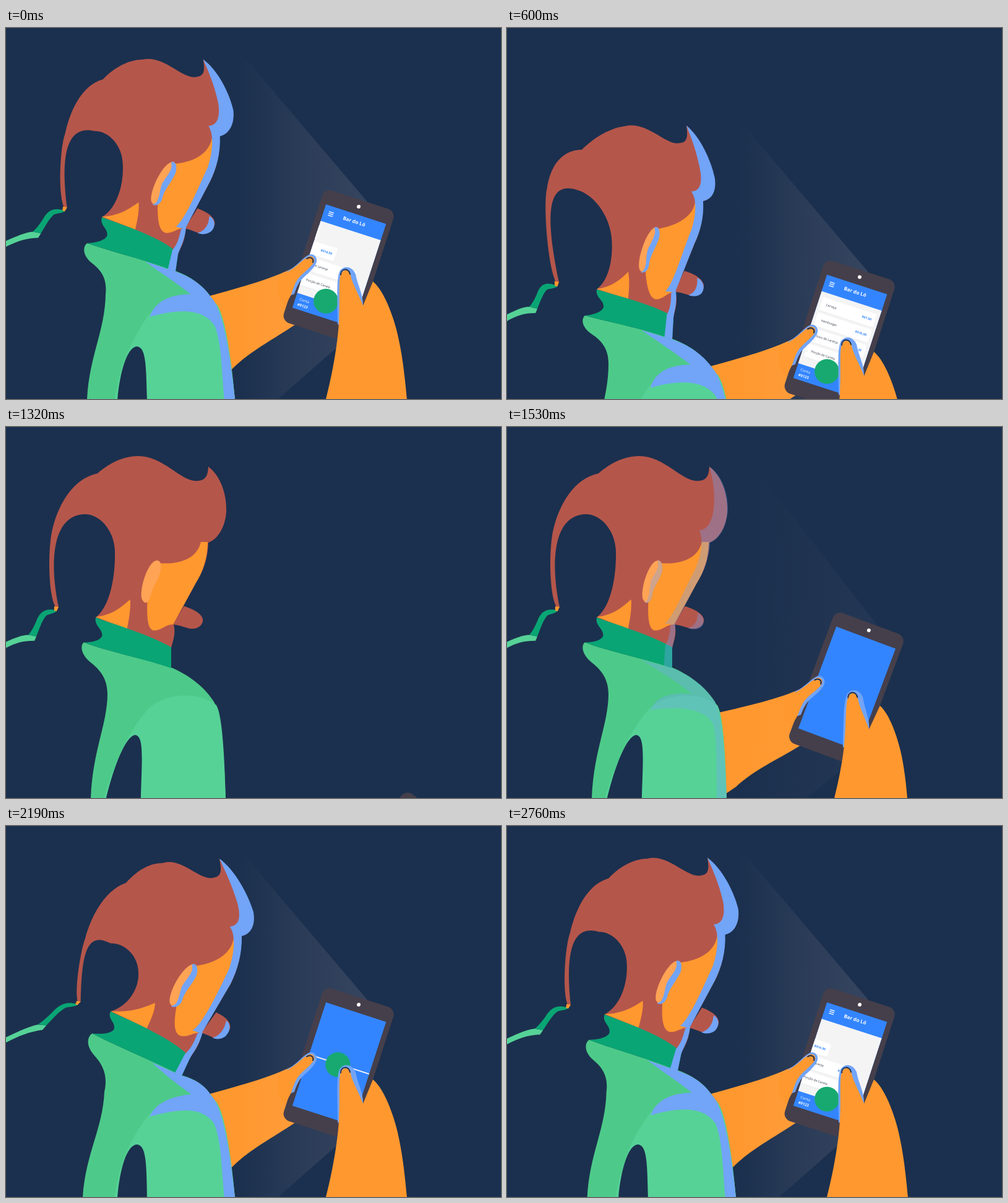
An HTML page with a canvas that plays this animation: 800 by 600 pixels, repeating every 2.79 s.

```html
<!DOCTYPE html>
<html lang="pt">
<head>
<meta charset="utf-8">
<title>Bar app</title>
<style>
html, body { margin: 0; width: 100%; height: 100%; overflow: hidden; background: #1b304e; }
canvas { display: block; width: 800px; height: 600px; }
</style>
</head>
<body>
<canvas id="stage" width="800" height="600"></canvas>
<script>
const LOOP = 2790, ENTER = 780;
const NAVY = '#1b304e', BLUE = '#72a4f7', ORANGE = '#ff982f', BROWN = '#b5564b';
const GREEN = '#4dca89', LIGHT = '#56d297', DARK = '#0aa574', APP = '#3385ff';

const ctx = document.getElementById('stage').getContext('2d');
const buffer = document.createElement('canvas');
buffer.width = 800;
buffer.height = 600;
const bufCtx = buffer.getContext('2d');

const clamp = p => Math.max(0, Math.min(1, p));
const span = (t, start, length) => clamp((t - start) / length);
const mix = (a, b, p) => a + (b - a) * p;
const easeIn = p => p * p;
const easeOut = p => 1 - (1 - p) * (1 - p);
const easeBoth = p => p < .5 ? 2 * p * p : 1 - 2 * (1 - p) * (1 - p);

// Landmarks: tip, crown, bump, back, tail end, gap top, gap right, ear top, ear bottom,
// fringe, brow, nose, chin, collar (4), waist, hem, armhole (3), hip, shoulder, cord (2), side.
const POSES = {
  look: [333,68, 218,48, 152,76, 73,210, 81,291, 133,140, 178,200, 246,217, 225,286,
    359,130, 330,188, 318,317, 238,329, 146,307, 267,360, 267,391, 123,360, 164,430, 137,600,
    212,515, 180,600, 228,600, 370,600, 330,433, 0,352, 45,340, 358,470],
  lean: [320,52, 221,51, 157,83, 91,210, 95,290, 145,167, 189,222, 267,217, 241,287,
    366,130, 345,175, 337,320, 257,331, 155,306, 278,366, 274,394, 127,357, 161,430, 131,600,
    212,515, 180,600, 228,600, 370,600, 330,433, 0,350, 50,333, 358,470],
  bend: [346,54, 253,60, 194,92, 125,210, 117,284, 170,190, 214,237, 300,224, 271,293,
    398,136, 380,178, 361,331, 281,339, 169,300, 297,376, 284,404, 134,344, 159,430, 124,600,
    212,515, 180,600, 228,600, 370,600, 330,433, 0,347, 58,324, 358,470],
  rest: [291,45, 190,45, 121,83, 64,190, 80,297, 116,149, 169,225, 238,209, 220,282,
    334,125, 316,166, 318,306, 240,325, 145,309, 269,355, 267,390, 123,360, 164,430, 137,600,
    212,515, 180,600, 228,600, 370,600, 330,433, 0,356, 43,341, 358,470],
  stand: [328,65, 213,47, 148,75, 71,210, 81,291, 128,141, 176,200, 243,216, 225,285,
    356,130, 327,187, 318,315, 238,329, 145,308, 267,358, 267,390, 123,357, 164,432, 137,600,
    209,498, 161,600, 218,600, 355,600, 332,438, 0,353, 43,340, 352,470],
  back: [201,24, 147,54, 75,98, 5,200, 60,300, 92,157, 170,240, 217,198, 212,274,
    285,100, 282,135, 318,286, 237,318, 147,316, 274,348, 272,387, 122,362, 174,430, 137,600,
    209,496, 157,600, 220,600, 358,600, 322,430, 0,362, 40,345, 355,470]
};

const MAN = [
  [LIGHT, 'M51 339 L38 336 C25 336 12 342 -12 351 L-12 362 C12 350 25 345 48 346 Z'],
  [DARK, 'M83 297 L80 296 C62 293 55 300 50 315 C46 325 42 332 38 336 L51 339 C56 325 60 312 66 305 C72 302 78 302 83 297 Z'],
  [BROWN, 'M80 291 C68 270 70 190 80 160 C90 125 112 84 152 76 C168 62 192 48 218 48 C260 48 288 92 315 89 C328 88 331 80 332 67 C352 82 360 110 359 135 C358 160 346 182 330 188 C329 215 320 237 308 255 L271 321 C275 340 268 350 267 361 L146 307 C168 290 178 245 178 200 C178 165 155 140 132 140 C84 142 70 205 85 291 Z'],
  [ORANGE, 'M78 290 L85 291 L82 298 L78 297 Z'],
  [BROWN, 'M288 292 C300 296 315 302 318 312 C320 322 308 330 296 328 C286 325 278 322 270 321 Z'],
  [ORANGE, 'M318 187 L329 187 C328 215 320 237 308 255 L270 321 C258 320 250 331 238 329 C226 325 228 295 229 275 C234 260 252 240 250 221 C285 225 312 213 318 187 Z'],
  ['#ffa355', 'M246 217 C232 218 215 265 220 280 C226 291 232 283 235 272 C238 258 252 245 253 228 C254 220 250 216 246 217 Z'],
  [ORANGE, 'M146 306 C172 304 188 290 201 279 C202 295 199 310 196 326 Z'],
  [GREEN, 'M126 351 C160 362 220 374 267 390 C300 402 320 420 332 436 C350 455 362 520 370 600 L370 602 L137 602 L137 600 C140 530 164 490 164 430 C164 405 152 392 137 382 C120 370 120 356 126 351 Z'],
  [DARK, 'M146 307 C180 320 230 335 267 358 L267 391 C220 374 160 362 126 351 C140 350 153 346 156 338 C157 325 143 322 146 307 Z'],
  [LIGHT, 'M176 602 C185 545 205 500 232 462 C260 432 310 424 340 446 C352 460 363 520 370 602 Z'],
  [NAVY, 'M180 603 C184 560 196 515 212 515 C226 517 226 545 228 603 Z']
];
const RIM = [
  'M332 67 C352 80 361 108 360 133 C358 162 346 182 331 188 C329 215 320 237 308 255 L271 321 C266 322 260 319 255 319 C270 308 290 260 305 235 C315 215 322 185 314 168 C326 167 336 155 338 125 C340 100 336 82 332 67 Z',
  'M308 303 C318 307 321 318 314 325 C308 330 298 330 292 327 C302 325 309 316 308 303 Z',
  'M246 217 C252 216 256 224 253 236 C248 250 236 262 235 276 C232 285 226 288 221 284 C232 284 230 262 234 250 C240 238 250 230 246 217 Z',
  'M264 322 L272 320 C273 340 268 350 267 361 L267 391 L254 387 L256 354 C262 345 263 335 264 322 Z',
  'M216 376 L267 391 C300 402 320 420 332 436 C350 455 362 520 370 602 L353 602 C349 560 349 510 338 482 C318 452 275 455 232 467 C240 440 265 430 297 430 C270 410 250 398 216 376 Z'
];

// Thin-plate warp from the "look" landmarks to another pose.
function solve(m, rhs) {
  const n = m.length, a = m.map((row, i) => [...row, rhs[i]]);
  for (let i = 0; i < n; i++) {
    let best = i;
    for (let r = i + 1; r < n; r++) if (Math.abs(a[r][i]) > Math.abs(a[best][i])) best = r;
    [a[i], a[best]] = [a[best], a[i]];
    for (let r = 0; r < n; r++) {
      if (r === i) continue;
      const f = a[r][i] / a[i][i];
      for (let c = i; c <= n; c++) a[r][c] -= f * a[i][c];
    }
  }
  return a.map((row, i) => row[n] / row[i]);
}
const pairs = list => list.reduce((out, v, i) => (i % 2 ? out[out.length - 1].push(v) : out.push([v]), out), []);
const marks = pairs(POSES.look).map(([x, y]) => [x / 100, y / 100]);
const kernel = (dx, dy) => {
  const d = dx * dx + dy * dy;
  return d ? d * Math.log(d) : 0;
};
const basis = (x, y) => [...marks.map(m => kernel(x - m[0], y - m[1])), 1, x, y];
const matrix = marks.map(m => basis(m[0], m[1]));
[() => 1, m => m[0], m => m[1]].forEach(f => matrix.push([...marks.map(f), 0, 0, 0]));

const warps = {};
for (const name in POSES) {
  const pts = pairs(POSES[name]);
  warps[name] = [0, 1].map(k => solve(matrix, [...pts.map(p => p[k]), 0, 0, 0]));
}
const dot = (a, b) => a.reduce((s, v, i) => s + v * b[i], 0);

function shape(path) {
  const cmds = path.match(/[MLCZ]/g).join('');
  const pts = pairs(path.match(/-?\d+/g).map(Number));
  const at = {};
  for (const name in warps) {
    at[name] = pts.map(([x, y]) => {
      const b = basis(x / 100, y / 100);
      return [dot(b, warps[name][0]), dot(b, warps[name][1])];
    });
  }
  return { cmds, at };
}
const man = MAN.map(([color, path]) => ({ color, form: shape(path) }));
const rim = RIM.map(shape);

function fillShape(c, form, pose, color) {
  let i = 0;
  const next = () => {
    const a = form.at[pose.from][i], b = form.at[pose.to][i++];
    return [mix(a[0], b[0], pose.p), mix(a[1], b[1], pose.p)];
  };
  c.beginPath();
  for (const cmd of form.cmds) {
    if (cmd === 'M') c.moveTo(...next());
    else if (cmd === 'L') c.lineTo(...next());
    else if (cmd === 'C') c.bezierCurveTo(...next(), ...next(), ...next());
    else c.closePath();
  }
  c.fillStyle = color;
  c.fill();
}

const MOVES = [
  [780, 960, 'back', 'back', easeOut],
  [960, 1320, 'back', 'stand', easeBoth],
  [1620, 1770, 'stand', 'look', easeIn],
  [1770, 2150, 'look', 'bend', easeBoth],
  [2500, 2790, 'bend', 'lean', easeIn],
  [2790, 3080, 'lean', 'rest', easeOut]
];
function poseAt(t) {
  const [start, end, from, to, ease] = MOVES.filter(m => m[0] <= t).pop() || MOVES[0];
  return { from, to, p: ease(span(t, start, end - start)) };
}

function drawMan(c, t) {
  const pose = poseAt(t);
  c.save();
  if (t < 1200) c.translate(-87 * ((1200 - t) / 240) ** 3, 0);
  man.forEach(m => fillShape(c, m.form, pose, m.color));
  c.globalAlpha *= span(t, 1480, 150);
  if (c.globalAlpha > 0 && t > 1480) rim.forEach(f => fillShape(c, f, pose, BLUE));
  c.restore();
}

const fillPath = (c, d, color) => {
  c.fillStyle = color;
  c.fill(new Path2D(d));
};
function strokePath(c, d) {
  c.strokeStyle = NAVY;
  c.lineWidth = 2;
  c.lineCap = 'round';
  c.stroke(new Path2D(d));
}
function box(c, x, y, w, h, r, color) {
  c.fillStyle = color;
  c.beginPath();
  c.roundRect(x, y, w, h, r);
  c.fill();
}
function disc(c, x, y, r, color) {
  c.fillStyle = color;
  c.beginPath();
  c.arc(x, y, r, 0, 7);
  c.fill();
}
function label(c, text, x, y, size, color, weight = 400, align = 'left') {
  c.font = `${weight} ${size}px "Open Sans", sans-serif`;
  c.textAlign = align;
  c.textBaseline = 'middle';
  c.fillStyle = color;
  c.fillText(text, x, y);
}

const CARDS = [
  ['Cerveja', 'R$7,90', 2690],
  ['Hamburger', 'R$16,90', 2580],
  ['Suco de Laranja', 'R$6,30', 2470],
  ['Porção de Canela', 'R$9,90', 2430]
];
const W = 102.5, H = 176;

function drawScreen(c, t) {
  const open = easeBoth(span(t, 2165, 340));
  const top = mix(88.5, 28, open), foot = mix(89, 150.5, open);
  c.save();
  c.beginPath();
  c.rect(0, 0, W, H);
  c.clip();
  c.fillStyle = APP;
  c.fillRect(0, 0, W, H);
  if (open > 0) {
    c.save();
    c.beginPath();
    c.rect(0, top, W, foot - top);
    c.clip();
    c.fillStyle = '#f4f4f5';
    c.fillRect(0, 0, W, H);
    CARDS.forEach(([name, price, start], i) => {
      const x = -105 * (1 - easeBoth(span(t, start, 440))), y = 47.3 + i * 26.3;
      box(c, x + 5, y - 10, 92, 22, 2, '#e9eaec');
      box(c, x + 5, y - 11, 92, 22, 2, '#fff');
      label(c, name, x + 14, y, 5, '#333b48');
      label(c, price, x + 91, y, 5, APP, 700, 'right');
    });
    c.restore();
    c.globalAlpha = span(t, 2380, 160);
    [-3, 0, 3].forEach(d => box(c, 8.5, 12 + d, 8, 1.3, 0, '#fff'));
    label(c, 'Bar do Ló', 52, 13, 8, '#fff', 700, 'center');
    label(c, 'Conta', 15, 159.5, 6, '#fff', 400, 'center');
    label(c, '#0123', 15, 168.5, 6, '#fff', 700, 'center');
    c.globalAlpha = 1;
  }
  c.restore();
  const drop = easeBoth(span(t, 2110, 400));
  disc(c, mix(49.6, 48.5, drop), mix(84.8, 149, drop), 20 * easeOut(span(t, 1560, 180)), '#17a970');
}

function drawPhone(c, t) {
  c.save();
  c.translate(517, 285);
  c.rotate(18 * Math.PI / 180);
  box(c, -10, -24, 121, 225.5, 13, '#453f4b');
  disc(c, 51.6, -12.6, 3, '#fff');
  drawScreen(c, t);
  c.restore();
}

function drawBeam(c, t) {
  const g = c.createLinearGradient(375, 0, 590, 0);
  g.addColorStop(0, 'rgba(255,222,222,0)');
  g.addColorStop(.53, 'rgba(255,222,222,.075)');
  g.addColorStop(1, 'rgba(255,222,222,.12)');
  c.globalAlpha = span(t, 1490, 130);
  fillPath(c, 'M375 35 L583 280 L540 512 L375 657 Z', g);
  c.globalAlpha = 1;
}

function holdPose(c, t, draw) {
  const k = 1.1 * (1 - span(t, 1304, 340)) ** 2;
  if (t < 1304) return;
  c.save();
  c.translate(560, 640 + 322 * k);
  c.rotate(k * 20 * Math.PI / 180);
  c.translate(-560, -640);
  draw();
  c.restore();
}

function drawLeftArm(c) {
  fillPath(c, 'M250 470 L330 433 C385 418 430 405 462 389 L500 385 L495 470 L467 480 C430 505 395 522 366 551 L300 600 Z', ORANGE);
}

function drawHands(c) {
  fillPath(c, 'M455 393 C470 386 482 368 492 366 C501 366 504 374 501 381 C495 393 482 401 475 410 C470 418 468 424 466 430 L459 433 L450 410 Z', BLUE);
  fillPath(c, 'M440 401 C465 394 480 372 491 369 C498 369 500 375 497 380 C490 390 478 397 471 407 C466 415 464 422 461 431 L450 452 L438 430 Z', ORANGE);
  strokePath(c, 'M486 373 C492 369 498 373 496 379');
  fillPath(c, 'M536 480 C536 440 533 405 540 392 C548 383 560 386 565 398 C568 416 578 432 577 449 L560 470 Z', BLUE);
  fillPath(c, 'M517 600 C530 550 537 500 538 475 C540 440 537 410 541 398 C546 388 555 390 557 400 C560 415 570 430 577 449 L593 410 C612 425 630 475 636 510 C643 545 646 580 648 600 L660 760 L480 760 Z', ORANGE);
  strokePath(c, 'M541 399 C541 388 554 388 556 398');
}

function drawScene(c, time) {
  const t = time < ENTER ? time + LOOP : time;
  c.fillStyle = NAVY;
  c.fillRect(0, 0, 800, 600);
  c.save();
  c.translate(0, .00717 * Math.max(0, t - LOOP - 475) ** 2);
  holdPose(c, t, () => {
    drawLeftArm(c);
    drawBeam(c, t);
  });
  drawMan(c, t);
  holdPose(c, t, () => {
    drawPhone(c, t);
    drawHands(c);
  });
  c.restore();
}

function render(t) {
  if (t < ENTER + 15 || t > 1180) return drawScene(ctx, t);
  // Average several moments for the blurred slide-in.
  const samples = 10;
  for (let i = 0; i < samples; i++) {
    drawScene(bufCtx, t + (i / (samples - 1) - .5) * 22);
    ctx.globalAlpha = 1 / (i + 1);
    ctx.drawImage(buffer, 0, 0);
  }
  ctx.globalAlpha = 1;
}

const began = performance.now();
function tick() {
  render((performance.now() - began) % LOOP);
  requestAnimationFrame(tick);
}
tick();
</script>
</body>
</html>
```
